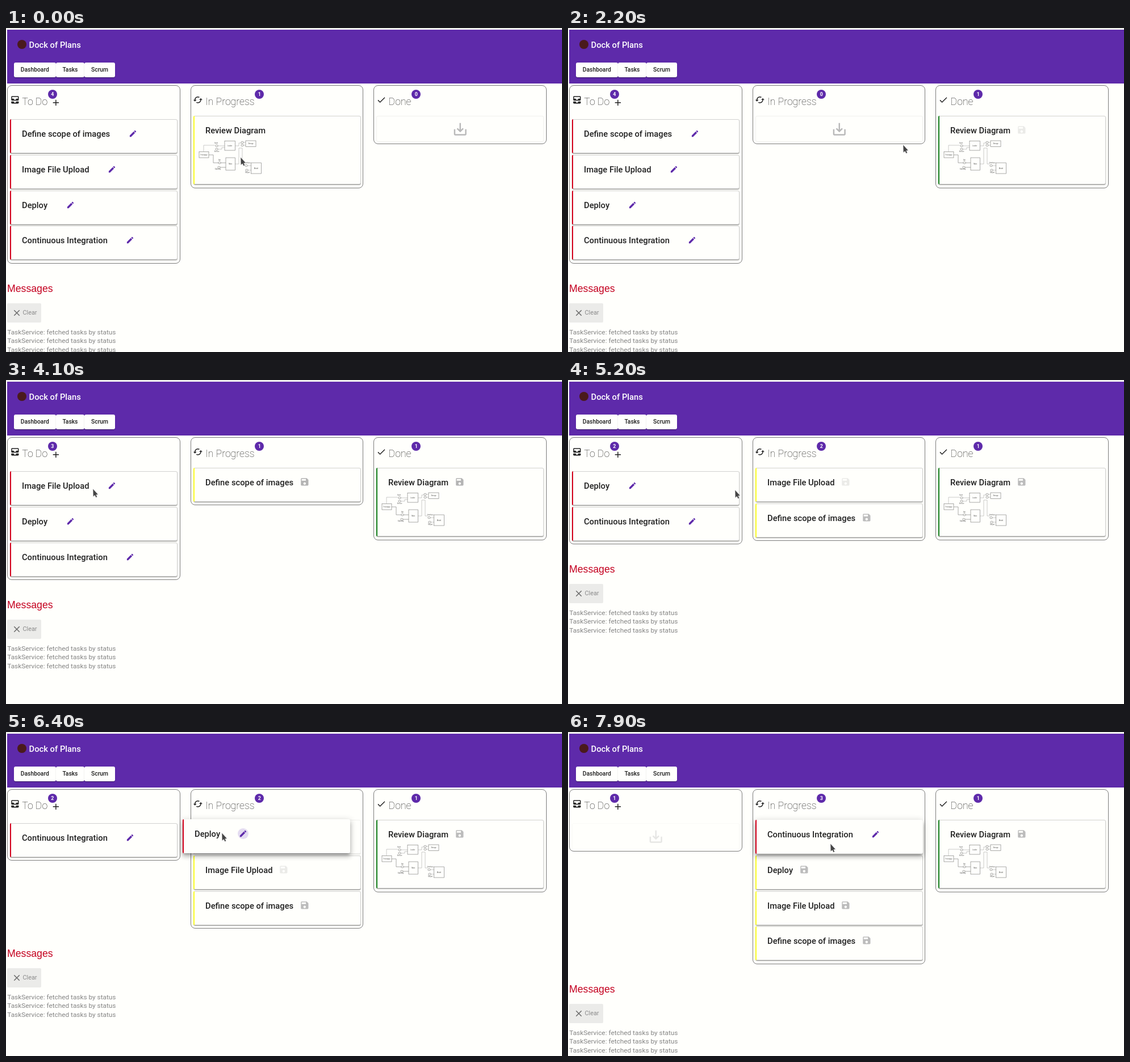
An HTML page that plays this animation: 979x572 px, repeating every 8000 ms.

```html
<!DOCTYPE html>
<html lang="en">
<head>
<meta charset="utf-8">
<title>Task board</title>
<style>
  html, body { margin: 0; width: 100%; height: 100%; overflow: hidden; background: #fffffc; }
  body { position: relative; font-family: Roboto, "Liberation Sans", sans-serif; color: #212121; }
  div, span, svg { box-sizing: border-box; }
  svg { display: block; fill: currentColor; overflow: visible; }
  .abs, .col, .card, .card > *, .label > *, #log > * { position: absolute; white-space: nowrap; }

  .strip { left: 0; top: 0; width: 100%; height: 2px; background: #ececec; }
  .bar { left: 2px; top: 3px; right: 0; height: 94.5px; background: #5e2aaa; }
  .dot { left: 18px; top: 18px; width: 16px; height: 16px; border-radius: 50%; background: #4a1a1c; }
  .brand { left: 38.5px; top: 17px; color: #fff; font: 500 14.74px/20px Roboto, sans-serif; }
  .nav { left: 12px; top: 57.5px; display: flex; }
  .nav span { padding: 0 11.8px; border-radius: 3px; background: #fffffd; color: #1c1c1c;
    font: 500 10.32px/26.5px Roboto, sans-serif;
    box-shadow: 0 2px 1px -1px rgba(0,0,0,.2), 0 1px 1px rgba(0,0,0,.14), 0 1px 2px rgba(0,0,0,.12); }

  .col { top: 101px; width: 304.5px; border: 1px solid #7c7c7c; border-radius: 8px; }
  .col > .icon { left: 3.7px; top: 16.2px; color: #222; position: absolute; }
  .label { position: absolute; left: 25.2px; top: 16px; white-space: nowrap;
    font: 100 17.7px/24px Roboto, sans-serif; color: #222; }
  .badge { left: 100%; top: -9.3px; margin-left: .5px; width: 16.4px; height: 16.4px; border-radius: 50%;
    background: #5e2aaa; color: #fff; text-align: center; font: 600 8.84px/16.6px Roboto, sans-serif; }
  .plus { left: 100%; top: 5.3px; margin-left: 6px; }
  .empty { position: absolute; left: 4px; width: 295px; height: 46px; border: 1px solid #f1f1ee;
    border-radius: 3px; color: #b9b9b9; }
  .empty svg { margin: 7.5px auto 0; }

  .card { left: 0; top: 0; width: 295px; height: 59.5px; border-radius: 3px; background: #fffffc;
    border: 1px solid #d2d2d0; overflow: visible;
    box-shadow: 0 1.5px 1px -.7px rgba(0,0,0,.3), 0 1px 1px rgba(0,0,0,.16), 0 1px 2px rgba(0,0,0,.12); }
  .card.tall { height: 121px; }
  .card::before { content: ""; position: absolute; left: -1px; top: -1px; bottom: -1px; width: 2.4px;
    border-radius: 3px 0 0 3px; background: var(--edge); }
  .name { left: 20px; top: 14.5px; display: flex; align-items: center;
    font: 500 14.74px/20px Roboto, sans-serif; }
  .pencil { margin-left: 32.5px; color: #5e2aaa; border-radius: 50%; }
  .save { margin: -2px 0 0 11px; color: #b4b4b4; }
  .plan { left: 7px; top: 40px; fill: none; stroke: #707070; stroke-width: .6; }
  .plan text { fill: #555; stroke: none; font: 2.7px Roboto, sans-serif; text-anchor: middle; }
  .ghost { border-color: transparent;
    box-shadow: 0 3.7px 3.7px -2.2px rgba(0,0,0,.24), 0 5.9px 7.4px .7px rgba(0,0,0,.17), 0 2.2px 10.3px 1.5px rgba(0,0,0,.15); }
  .ghost.hover .pencil { background: #e4dcf1; box-shadow: 0 0 0 2px #e4dcf1; }

  #log { position: absolute; left: 0; top: 0; }
  #log .head { left: 2px; top: 32px; font: 17.69px/24px "Liberation Sans", Arial, sans-serif; color: #c4001f; }
  #log .clear { left: 2px; top: 70px; width: 60px; height: 33.5px; border-radius: 2px; background: #ebebe9;
    color: #8a8a8a; font: 10.8px/33px Roboto, sans-serif; padding-left: 27.5px; }
  .clear svg { position: absolute; left: 7.5px; top: 8.3px; color: #6c6c6c; }
  #log .line { left: 2.3px; font: 11.82px/16px Roboto, sans-serif; color: #858585; }
  #cursor { left: 0; top: 0; fill: #444; stroke: #fff; stroke-width: .5; }
</style>
</head>
<body>
<div class="abs strip"></div>
<div class="abs bar">
  <div class="abs dot"></div>
  <div class="abs brand">Dock of Plans</div>
  <div class="abs nav"><span>Dashboard</span><span>Tasks</span><span>Scrum</span></div>
</div>
<div id="board"></div>
<div id="log"></div>
<svg id="cursor" class="abs" width="12" height="16"><path d="M0 0L9.3 10.2 5.8 10.6 7.6 14.4 5.2 15.4 3.4 11.6 .4 14Z"/></svg>

<script>
const PATHS = {
  inbox: 'M19 3H5c-1.1 0-2 .9-2 2v7c0 1.1.9 2 2 2h14c1.1 0 2-.9 2-2V5c0-1.1-.9-2-2-2zm0 6h-4c0 1.62-1.38 3-3 3s-3-1.38-3-3H5V5h14v4zm-4 7h6v3c0 1.1-.9 2-2 2H5c-1.1 0-2-.9-2-2v-3h6c0 1.66 1.34 3 3 3s3-1.34 3-3z',
  cycle: 'M19 8l-4 4h3c0 3.31-2.69 6-6 6-1.01 0-1.97-.25-2.8-.7l-1.46 1.46C8.97 19.54 10.43 20 12 20c4.42 0 8-3.58 8-8h3l-4-4zM6 12c0-3.31 2.69-6 6-6 1.01 0 1.97.25 2.8.7l1.46-1.46C15.03 4.46 13.57 4 12 4c-4.42 0-8 3.58-8 8H1l4 4 4-4H6z',
  check: 'M9 16.2L4.8 12l-1.4 1.4L9 19 21 7l-1.4-1.4L9 16.2z',
  plus: 'M19 13h-6v6h-2v-6H5v-2h6V5h2v6h6v2z',
  pencil: 'M3 17.25V21h3.75L17.81 9.94l-3.75-3.75L3 17.25zM20.71 7.04c.39-.39.39-1.02 0-1.41l-2.34-2.34c-.39-.39-1.02-.39-1.41 0l-1.83 1.83 3.75 3.75 1.83-1.83z',
  save: 'M17 3H5c-1.11 0-2 .9-2 2v14c0 1.1.89 2 2 2h14c1.1 0 2-.9 2-2V7l-4-4zm-5 16c-1.66 0-3-1.34-3-3s1.34-3 3-3 3 1.34 3 3-1.34 3-3 3zm3-10H5V5h10v4z',
  tray: 'M19 12v7H5v-7H3v7c0 1.1.9 2 2 2h14c1.1 0 2-.9 2-2v-7h-2zm-6 .67l2.59-2.58L17 11.5l-5 5-5-5 1.41-1.41L11 12.67V3h2v9.67z',
  cross: 'M19 6.41L17.59 5 12 10.59 6.41 5 5 6.41 10.59 12 5 17.59 6.41 19 12 13.41 17.59 19 19 17.59 13.41 12z'
};
const icon = (name, size, cls = '') =>
  `<svg class="${cls}" width="${size}" height="${size}" viewBox="0 0 24 24"><path d="${PATHS[name]}"/></svg>`;

const box = (x, y, w, h, label) =>
  `<rect x="${x}" y="${y}" width="${w}" height="${h}"/><text x="${x + w / 2}" y="${y + h / 2 + 1}">${label}</text>`;
const port = (x, y) => `<ellipse cx="${x}" cy="${y}" rx="2.2" ry="1.8"/>`;
const note = (x, y, s) => `<text x="${x}" y="${y}">${s}</text>`;
const PLAN = `<svg class="plan" width="114" height="64" viewBox="338 196 114 64">
  <path stroke="#aaa" d="M348 218V207H368M373 208H385M373 214H380V211H385M404 208H410V203H414M418 202H422M418 207H422M403 240H410V212H416V240H421M425 243H432M426 251H432"/>
  <path d="M357 224H365V238H374M378 238H387M377 246H387"/>
  ${box(385, 199.5, 18.5, 16.5, 'Loader')}${box(387, 229, 16.5, 22, 'Main')}${box(340, 218.5, 17, 10.5, 'Frontpage')}
  ${box(422, 199, 18, 10.5, 'Storage')}${box(431.5, 238, 18, 19, 'Model')}
  ${port(371, 208)}${port(371, 214)}${port(376, 238)}${port(375, 246)}${port(416, 202)}${port(416, 207)}${port(423, 243)}${port(424, 251)}
  ${note(370, 204, 'Input')}${note(371, 219, 'Service')}${note(376, 234, 'Api')}${note(373, 250, 'Gateway')}${note(425, 239, 'Interface')}${note(425, 256, 'Output')}
</svg>`;

const COLS = [
  { title: 'To Do', icon: 'inbox', x: 2, top: 161 },
  { title: 'In Progress', icon: 'cycle', x: 324.8, top: 155 },
  { title: 'Done', icon: 'check', x: 647.4, top: 155 }
];
const EDGE = ['#d3001b', '#fdff2b', '#16801d'];
const TASKS = ['Define scope of images', 'Image File Upload', 'Deploy', 'Continuous Integration', 'Review Diagram'];
const REVIEW = 4, DEPLOY = 2, UPLOAD = 1;
const START = [[0, 1, 2, 3], [4], []];

// Each drag: dx, dy is where the pointer holds the card.
const MOVES = [
  { task: 4, from: 1, to: 2, dx: 84.5, dy: 72, start: 1000, enter: 1500, drop: 1900, land: 2200 },
  { task: 0, from: 0, to: 1, dx: 78, dy: 31.5, start: 3100, enter: 3200, drop: 3500, land: 3800 },
  { task: 1, from: 0, to: 1, dx: 145.5, dy: 30.5, start: 4300, enter: 4600, drop: 4800, land: 5200 },
  { task: 2, from: 0, to: 1, dx: 69, dy: 24, start: 5500, enter: 6200, drop: 6500, land: 6800 },
  { task: 3, from: 0, to: 1, dx: 132, dy: 42, start: 7300, enter: 7600, drop: 7700, land: 8000 }
];

// Pointer path: time, x, y
const TRACK = [
  [0, 413, 227.5], [200, 413, 227.5], [300, 413.7, 226.7], [900, 413.7, 226.7], [1000, 432, 226],
  [1400, 712, 209], [1500, 718, 209], [1800, 718, 209], [2100, 690, 206], [2600, 190, 207],
  [2700, 163, 207], [2900, 156, 195], [3000, 156, 195], [3100, 140, 193], [3200, 287, 191],
  [3500, 420, 187], [3700, 390, 187], [4000, 160, 191], [4100, 152.5, 191.5], [4200, 152.5, 191.5],
  [4300, 165, 191], [4800, 455, 187], [5000, 430, 189], [5100, 430, 189], [5200, 293.5, 194],
  [5300, 80, 186], [5400, 80, 186], [5500, 90, 185], [6400, 380, 177.5], [6600, 398, 180],
  [6800, 370, 186], [7200, 139, 203], [7300, 150, 203], [7700, 462, 197], [8000, 462, 197]
];

const $ = id => document.getElementById(id);
function add(parent, cls, html) {
  const el = document.createElement('div');
  el.className = cls;
  el.innerHTML = html;
  parent.append(el);
  return el;
}

const board = $('board'), log = $('log');
const cols = COLS.map((c, i) => {
  const el = add(board, 'col', icon(c.icon, 17.7, 'icon') +
    `<div class="label">${c.title}<span class="badge"></span>${i ? '' : icon('plus', 17.7, 'plus')}</div>` +
    `<div class="empty" style="top:${c.top - 102}px">${icon('tray', 29.5)}</div>`);
  el.style.left = c.x + 'px';
  return { el, badge: el.querySelector('.badge'), empty: el.querySelector('.empty') };
});

function makeCard(task, cls) {
  const tall = task === REVIEW;
  const el = add(board, `card ${cls} ${tall ? 'tall' : ''}`,
    `<div class="name">${TASKS[task]}${icon('pencil', 15, 'pencil')}${icon('save', 17.7, 'save')}</div>${tall ? PLAN : ''}`);
  return { el, pencil: el.querySelector('.pencil'), save: el.querySelector('.save') };
}
const cards = TASKS.map((_, i) => makeCard(i, ''));
const ghosts = TASKS.map((_, i) => makeCard(i, i === DEPLOY ? 'ghost hover' : 'ghost'));

add(log, 'head', 'Messages');
add(log, 'clear', icon('cross', 18) + 'Clear');
for (let i = 0; i < 3; i++) {
  add(log, 'line', 'TaskService: fetched tasks by status').style.top = 112.7 + i * 15.5 + 'px';
}

const mix = (a, b, k) => a + (b - a) * k;
const clamp = v => Math.max(0, Math.min(1, v));
const show = (el, on) => { el.style.display = on ? '' : 'none'; };
// Whole pixels keep edges and text sharp.
const place = (el, x, y) => { el.style.transform = `translate(${Math.round(x)}px, ${Math.round(y)}px)`; };

function pointer(t) {
  const i = Math.max(1, TRACK.findIndex(k => k[0] > t));
  const [a, b] = [TRACK[i - 1], TRACK[i]];
  const k = (t - a[0]) / (b[0] - a[0]);
  return [mix(a[1], b[1], k), mix(a[2], b[2], k)];
}

// Saved marks pulse every 1.2 s.
function pulse(task, t) {
  const shift = task === UPLOAD && t < 7000 ? 600 : 0;
  const phase = (t - 2950 + shift + 1200) % 1200;
  return clamp(1.2 - Math.min(phase, 1200 - phase) / 480);
}

function dress(card, status, saved, task, t) {
  card.el.style.setProperty('--edge', EDGE[status]);
  show(card.pencil, status === 0);
  show(card.save, saved);
  card.save.style.opacity = pulse(task, t);
}

function render(t) {
  const lists = START.map(l => [...l]);
  const status = [0, 0, 0, 0, 1], saved = [], slot = [];
  let active = null;
  for (const m of MOVES) {
    if (t >= m.enter) {
      lists[m.from] = lists[m.from].filter(i => i !== m.task);
      lists[m.to].unshift(m.task);
    }
    if (t >= m.land) {
      status[m.task] = m.to;
      saved[m.task] = true;
    } else if (t >= m.start) active = m;
  }

  let floor = 0;
  COLS.forEach((c, i) => {
    let y = c.top;
    for (const task of lists[i]) {
      slot[task] = [c.x + 4.8, y];
      y += task === REVIEW ? 124.3 : 62.83;
    }
    const none = !lists[i].length;
    const bottom = Math.floor((none ? y + 46 : y) + 4);
    floor = Math.max(floor, bottom);
    cols[i].el.style.height = bottom - 101 + 'px';
    cols[i].badge.textContent = status.filter(s => s === i).length;
    show(cols[i].empty, none);
    cols[i].empty.style.opacity = active && t >= active.enter ? .35 : 1;
  });

  cards.forEach((card, i) => {
    place(card.el, ...slot[i]);
    card.el.style.opacity = active && active.task === i ? .3 : 1;
    dress(card, status[i], !!saved[i], i, t);
  });

  const [px, py] = pointer(t);
  ghosts.forEach((g, i) => show(g.el, active && active.task === i));
  if (active) {
    const { task, dx, dy, drop } = active;
    const [hx, hy] = pointer(Math.min(t, drop));
    const k = 1 - (1 - clamp((t - drop) / 200)) ** 2;
    dress(ghosts[task], status[task], false, task, t);
    place(ghosts[task].el, mix(hx - dx, slot[task][0], k), mix(hy - dy, slot[task][1], k));
  }
  place($('cursor'), px, py);
  place(log, 0, floor);
}

function tick() {
  const t = performance.now() % 8000;
  render(Math.floor(t / 100) * 100);
  requestAnimationFrame(tick);
}
tick();
</script>
</body>
</html>
```
